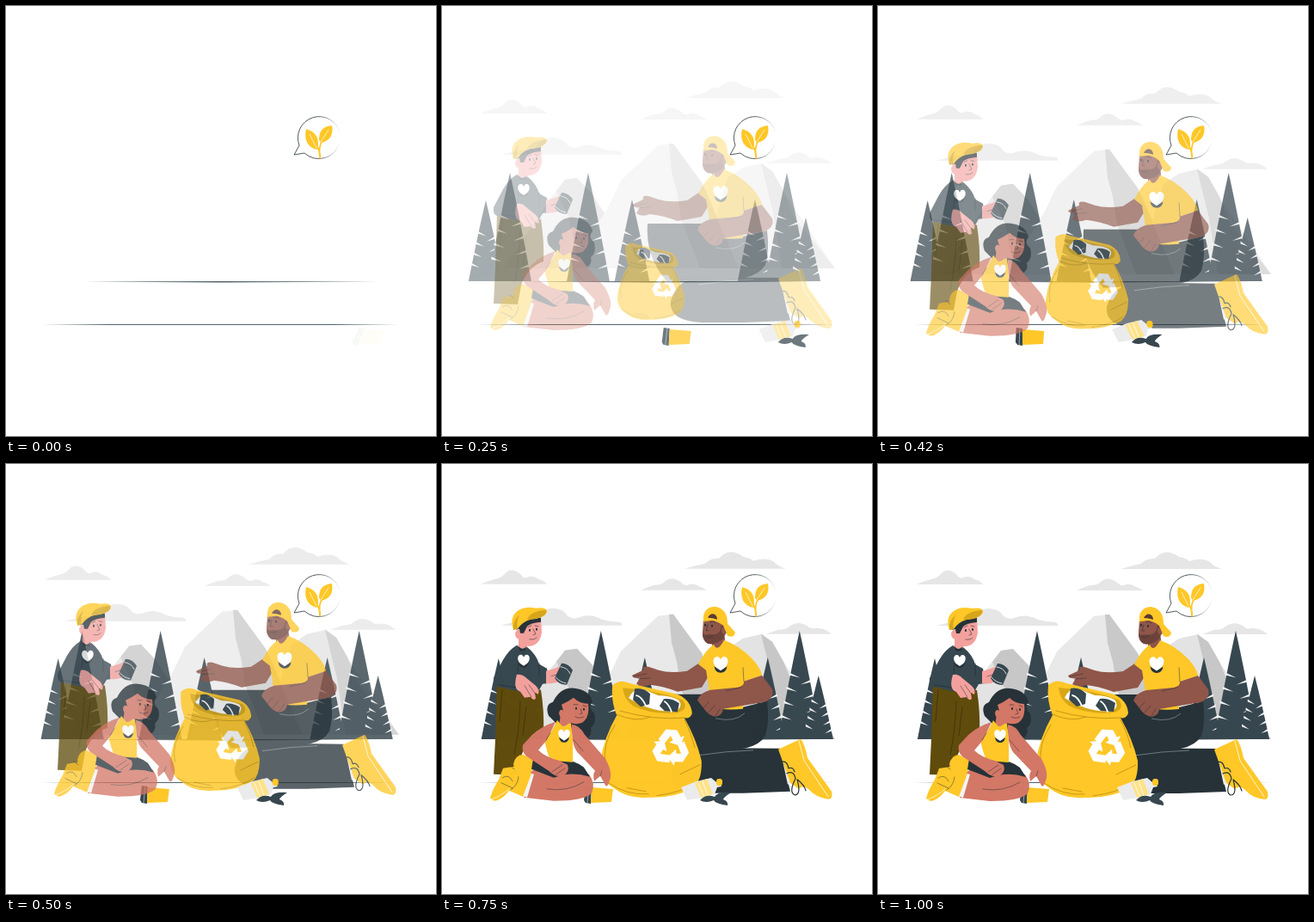
An HTML page for the animation above (1040 ms loop, 500 by 500 pixels).

```html
<!DOCTYPE html>
<html lang="en">
<head>
<meta charset="utf-8">
<title>Cleaning up together</title>
<style>
html, body { margin: 0; width: 100%; height: 100%; overflow: hidden; background: #fff; }
svg { display: block; width: 100vw; height: 100vh; }
.y { fill: #ffc727 } .d { fill: #263238 } .s { fill: #37474f } .w { fill: #fff }
.pink { fill: #f4a19d } .tan { fill: #d37766 } .brown { fill: #8f5649 }
.line, .pale, .fold { fill: none; stroke-linecap: round; stroke-linejoin: round }
.line { stroke: #263238 } .pale { stroke: #fff } .fold { stroke: #b98c12 }
</style>
</head>
<body>
<svg viewBox="0 0 500 500" stroke-width=".8">
<defs>
  <linearGradient id="fade" gradientUnits="userSpaceOnUse" x1="362" x2="389" y1="0" y2="0">
    <stop stop-color="#263238"/><stop offset="1" stop-color="#263238" stop-opacity="0"/>
  </linearGradient>
  <path id="arrow" d="M-15-9-7-21H6L11-13 15-15 11-3-2-6 2-9-1-14-8-4Z"/>
  <g id="emblem">
    <path class="w" d="M0 7C-9 1-8-7-3-7Q-1-7 0-4Q1-7 3-7C8-7 9 1 0 7Z"/>
    <path class="d" d="M-6 2Q-5 8 0 8Q5 8 6 2L0 6Z"/>
  </g>
</defs>

<path fill="#52646b" d="M93 320.500 250 320.100 433 320.500 250 321.500ZM42 370.500 120 370H380L456 370.500 380 371H120Z"/>

<g id="clouds" fill="#e6e6e6">
  <path d="M282 122Q296 118 306 116Q312 109 322 110Q334 96 350 108Q358 109 362 113Q376 108 386 114Q390 119 400 122Z"/>
  <path d="M45 140Q53 136 62 134Q68 133 72 129Q80 119 91 128Q95 134 99 132Q106 129 112 134Q120 136 122 140Z"/>
  <path d="M231 147Q240 143 247 141Q256 141 259 137Q266 130 277 137Q282 142 286 141Q292 138 298 142Q304 144 308 147Z"/>
  <path d="M68 188Q90 182 108 181Q114 168 130 168Q142 169 146 177Q152 181 158 179Q172 173 186 181Q196 184 206 184Q210 185 209 188Z"/>
  <path d="M377 198Q385 195 391 193Q400 193 404 189Q414 182 424 188Q429 193 434 191Q444 190 453 198Z"/>
</g>

<g id="hills">
  <path fill="#e3e3e3" d="M72 320 128 236 143 217 157 215 190 256 212 320ZM300 320 332 215 350 203 372 198 384 207 400 235 457 320Z"/>
  <path fill="#c7c7c7" d="M133 230 143 217 157 215 175 234 192 262 212 320H160L148 262ZM371 198 384 207 397 230 410 262 457 320H395L385 255Z"/>
  <path fill="#e9e9e9" d="M150 320 194 247 208 218 251 177 269 175 308 230 345 320Z"/>
  <path fill="#c9c9c9" d="M264 175H269L302 220 345 320H300L278 262 273 230 267 208Z"/>
</g>

<g id="trees"></g>

<g id="man">
  <path class="d" d="M239 268H304L350 283 378 276Q381 300 376 316Q370 327 352 331L262 336Q236 306 239 268Z"/>
  <path class="d" d="M393 331 405 381 350 383 302 383Q263 381 266 358Q274 331 300 332Q340 330 393 331Z"/>
  <path fill="none" stroke="#8c979c" stroke-width=".7" d="M298 339Q330 334 362 333M318 296Q340 301 352 290"/>
  <path fill="#ececec" d="M393 331 398 334 409 369 402 373Z"/>
  <path class="y" d="M391 332 417 320Q422 326 425 342L453 381Q455 390 449 390Q435 388 428 380Q420 372 415 378L405 371Z"/>
  <path class="pale" d="M415 322 421 345 449 387"/>
  <path class="line" stroke-width="1.200" d="M394 347Q401 344 403 354Q408 352 410 358M401 360Q409 356 411 366Q403 382 410 385Q418 385 413 367Q421 373 423 380"/>
  <path class="brown" d="M300 231 285 241Q265 244 252 240L240 236Q232 235 234 240L221 246Q222 250 230 249L226 256Q232 261 242 257Q255 258 274 265L302 260 313 242Z"/>
  <path class="line" stroke-width=".5" d="M223 247 238 244M228 250 242 249"/>
  <path class="brown" d="M313 205 316 222 330 212 328 196Z"/>
  <path class="y" d="M328 205Q345 211 360 226Q371 238 372 246L351 253 350 285Q325 288 308 280Q312 262 309 252L307 240 298 233Q306 217 316 210Q320 220 328 205Z"/>
  <path class="brown" d="M372 246 351 253Q352 258 344 260L312 263Q300 266 297 275L304 284Q310 293 318 294Q326 293 327 285L375 277Q387 272 384 262Z"/>
  <path class="line" stroke-width=".5" d="M351 253 350 237M304 284 310 277M310 289 317 281M318 293 323 285M330 264 348 260"/>
  <path class="brown" d="M304 182Q315 178 327 186L332 195 325 205Q318 211 309 209Q302 205 303 195Z"/>
  <path fill="#6c423a" d="M303 197Q305 200 311 198Q318 200 323 195L325 188 327 188 328 202Q320 211 309 209Q303 206 303 197Z"/>
  <ellipse class="brown" cx="328" cy="194" rx="3" ry="4"/>
  <path class="y" d="M304 185Q302 167 317 166Q332 168 332 186L341 196Q340 203 332 200L327 188Q314 178 304 185Z"/>
  <path fill="#5b3b32" d="M309 179Q312 173 317 175Q320 177 320 181Q314 179 309 179Z"/>
  <path class="line" stroke-width="2" d="M306 187V188M314 188V189"/>
  <path class="line" stroke-width=".6" d="M309 187 307 194H310M307 201Q311 203 315 200M304 184 307 183M312 184Q315 182 318 185"/>
  <use href="#emblem" transform="translate(324 233) scale(1.25)"/>
</g>

<g id="bag">
  <path class="y" d="M198 257Q207 249 219 255Q250 262 275 268Q290 275 291 290Q288 297 282 295Q296 320 302 345Q303 368 292 377Q270 389 240 388Q215 390 198 376Q181 365 184 345Q188 318 203 292Q196 275 198 257Z"/>
  <path fill="#d8a716" d="M210 260Q250 263 280 274Q288 285 274 289Q245 292 222 281Q211 273 210 260Z"/>
  <path class="w" d="M217 272Q223 258 237 263L252 269Q265 269 275 274Q281 281 273 287Q246 290 217 272Z"/>
  <path class="s" d="M224 261Q234 259 242 267L241 279 231 282 222 274ZM258 273Q268 272 276 278L274 288 259 287 253 281Z"/>
  <path class="pale" stroke-width="1.800" d="M226 269Q232 270 237 281M259 276Q264 279 267 288M243 267 247 281"/>
  <path class="fold" d="M203 291Q225 301 242 294M207 287Q245 298 282 295M201 303Q185 327 190 350M282 297Q291 315 294 330M193 371Q215 386 240 384M250 386Q280 382 295 371M215 377 237 381M300 350Q285 357 277 361"/>
  <g class="w" transform="translate(266 330) rotate(4)">
    <use href="#arrow"/><use href="#arrow" transform="rotate(120)"/><use href="#arrow" transform="rotate(240)"/>
  </g>
</g>

<g id="boy">
  <path fill="#5f4b0c" d="M64 255 115 263Q119 288 118 312Q100 318 92 340L88 362 60 361 62 320Z"/>
  <path fill="none" stroke="#3f3208" d="M91 276Q90 310 84 338M70 262 67 300M98 282 94 316"/>
  <path class="s" d="M87 211Q78 216 71 228L60 249Q59 257 64 259L90 265 113 263 117 256 125 255 122 238 113 233Q110 222 99 213L93 218Z"/>
  <path class="line" d="M88 245 89 230M113 232 113 246M66 257 86 260"/>
  <path class="pink" d="M87 245Q93 244 98 249L109 258Q114 263 112 268L108 266 109 273Q106 276 103 271L96 272 91 265Q82 262 87 245ZM121 241 131 238Q138 234 140 238L136 245 139 252Q130 257 121 255Z"/>
  <path class="line" stroke-width=".5" d="M96 258 104 271M101 257 109 268M127 247 136 244"/>
  <path class="s" d="M139 232Q147 232 152 240L145 257Q135 257 131 249Z"/>
  <path class="pale" d="M138 236Q146 237 149 244M132 248Q137 254 144 255"/>
  <path class="pink" d="M89 203V214Q96 219 100 211L99 204Z"/>
  <path class="d" d="M87 210Q94 219 98 212L97 217 91 218Z"/>
  <path class="pink" d="M92 189Q100 180 115 180L116 196Q114 210 103 212Q94 213 91 204Q85 204 85 197Q87 191 92 193Z"/>
  <path class="d" d="M86 193Q92 180 115 179L115 184Q103 185 99 189L95 197 91 197 90 192Z"/>
  <path class="y" d="M83 193Q78 178 88 171Q97 165 109 168Q123 166 122 173Q117 180 103 181Q93 184 88 192Z"/>
  <path fill="#d6a51a" d="M99 181Q103 171 121 170Q123 175 114 179Q104 181 99 181ZM83 193Q82 182 90 176Q86 184 88 192Z"/>
  <path class="line" stroke-width="2" d="M102 193V194M110 192V193"/>
  <path class="line" stroke-width=".6" d="M106 192 109 198 106 199M102 204Q107 205 110 202M100 190 104 188M108 188 112 189"/>
  <use href="#emblem" transform="translate(95 229)"/>
</g>

<g id="trash">
  <path fill="#ebebeb" d="M278 376 296 369 313 365 319 370 322 368 325 375 320 376 317 384 303 388 285 391Z"/>
  <path fill="#ffe28a" d="M294 371 308 366 315 384 301 388Z"/>
  <path class="pale" d="M298 371 304 386M303 369 309 385"/>
  <rect class="y" x="319" y="366" width="7" height="8" rx="3"/>
  <path class="s" d="M300 391Q307 383 317 387Q320 381 336 382Q327 388 327 390Q333 392 332 397Q318 395 316 391Q307 395 300 391Z"/>
  <path class="s" d="M167 374 174 375 173 395 167 394 165 391Z"/>
  <path class="y" d="M174 376 199 378 197 393 173 394Z"/>
  <path class="pale" stroke-width=".5" d="M171 375 169 394"/>
</g>

<g id="girl">
  <path class="d" d="M124 293Q119 280 129 277Q138 259 154 261Q172 263 175 277Q169 283 177 290Q180 302 173 307Q176 318 163 321Q150 318 150 305L133 302Z"/>
  <path class="y" d="M83 349Q85 339 94 338L107 345 104 360 85 358Z"/>
  <path class="tan" d="M107 355 132 361Q155 355 171 361Q179 372 174 383Q165 392 130 392L95 388 102 360Z"/>
  <path class="d" d="M106 343 126 345Q150 341 165 353L172 364Q150 357 130 365L104 355Z"/>
  <path fill="#f3f3f3" d="M93 386 101 359 107 361 99 388Z"/>
  <path class="y" d="M71 354 84 352 104 360 94 387 78 380Q70 391 61 392L56 389Q58 380 66 367Z"/>
  <path class="pale" stroke-width=".7" d="M58 390Q69 386 78 378"/>
  <path class="line" stroke-width=".5" d="M70 365Q78 360 82 369M69 371 82 377M80 379Q88 374 89 364M84 355 79 351"/>
  <path class="tan" d="M151 303Q160 304 166 315L190 343Q199 359 195 368Q192 379 189 372L184 363 177 369Q175 361 178 357L160 338Q150 330 151 303ZM138 291 136 305Q144 310 150 304L151 297Z"/>
  <path class="y" d="M134 298Q129 310 119 322Q122 335 126 345L152 347Q153 325 150 302L147 302Q141 308 138 303Z"/>
  <path class="tan" d="M132 300Q116 305 105 315L94 327Q92 334 98 340L124 357Q132 365 141 363Q149 358 146 350L136 345Q120 341 112 333L122 321Z"/>
  <path class="line" stroke-width=".5" d="M128 358 140 350M133 361 143 354M121 321 126 313M184 363 186 357M122 378Q145 382 165 370M153 321 164 334"/>
  <path class="tan" d="M139 280Q146 277 153 272Q160 279 170 279Q172 295 163 301Q152 305 144 297Q137 297 136 290Q137 284 141 287Z"/>
  <path class="line" stroke-width="2" d="M156 284V285M165 285V286"/>
  <path class="line" stroke-width=".6" d="M161 285 163 290 160 291M155 294Q160 297 165 294M153 280 158 280M164 281 168 282"/>
  <use href="#emblem" transform="translate(142 316)"/>
</g>

<path fill="none" stroke="url(#fade)" d="M388 147A24.700 24.700 0 1 0 341 162L335 173 347 171A24.700 24.700 0 0 0 388 158"/>
<path class="y" d="M349 143Q363 147 363 160Q363 166 361 167Q345 162 349 143ZM379 139Q364 140 364 155Q365 159 367 159Q382 155 379 139Z"/>
<path fill="none" stroke="#ffc727" stroke-width="1.800" d="M365 177.500Q366 171 362 164M365 175Q363 164 368 156"/>
<path class="pale" stroke-width=".7" d="M353 149 361 165M375 144 366 158"/>
</svg>
<script>
const LOOP = 1040, LAST = 24, STEP = 1000 / LAST, GROUND = 320;
const el = id => document.getElementById(id);

// A fir grows from its apex to the ground, with slits along both sides.
function tree([x, top]) {
  const h = GROUND - top, half = 6 + h * .15;
  let slits = '';
  for (let i = 0; i < 8; i++) {
    const side = i % 2 ? 1 : -1, f = .4 + i * .065;
    const edge = x + side * half * (f + .08), y = top + h * f;
    slits += `M${edge} ${y - 2}L${edge - side * half * .5} ${y + 4}L${edge} ${y + 1}Z`;
  }
  const bend = half * .45, mid = top + h * .4;
  return `<path class="s" d="M${x} ${top}Q${x + bend} ${mid} ${x + half} ${GROUND}H${x - half}Q${x - bend} ${mid} ${x} ${top}Z"/>
    <path fill="#f4f4f4" d="${slits}"/>`;
}
el('trees').innerHTML = [[66, 226], [94, 194], [185, 194], [236, 225], [379, 225], [416, 194], [438, 246]]
  .map(tree).join('');

const ease = s => Math.sin(Math.PI / 2 * Math.min(1, s / .8)) ** 1.3;
const decay = (s, width) => Math.exp(-((s / width) ** 4));

function pose(id, transform, opacity) {
  el(id).setAttribute('transform', transform);
  el(id).setAttribute('opacity', opacity);
}

function draw(time) {
  // 24 drawings a second; the first is held for two steps
  const n = Math.min(LAST, Math.floor((time % LOOP + 4) / STEP));
  const s = Math.max(0, n - 1) / (LAST - 1);
  const p = ease(s), slide = -22 * (1 - p), strong = p ** .7;

  for (const id of ['clouds', 'hills', 'man', 'boy', 'girl']) pose(id, `translate(0 ${slide})`, p);
  pose('trees', `translate(${slide} 0)`, strong);
  pose('bag', `translate(243 320) scale(${.5 + p / 2}) translate(-243 -320)`, strong);

  // The litter rushes in from the right, leans and settles.
  const dash = 240 * (1 - s / .37) * decay(s, .4);
  const lean = -20 * Math.cos(7.2 * s) * decay(s, .35);
  pose('trash', `translate(${dash} 384) skewX(${lean}) translate(0 -384)`, Math.min(1, .03 + 3.2 * s));
}

const start = performance.now();
function tick() {
  draw(performance.now() - start);
  requestAnimationFrame(tick);
}
tick();
</script>
</body>
</html>
```
